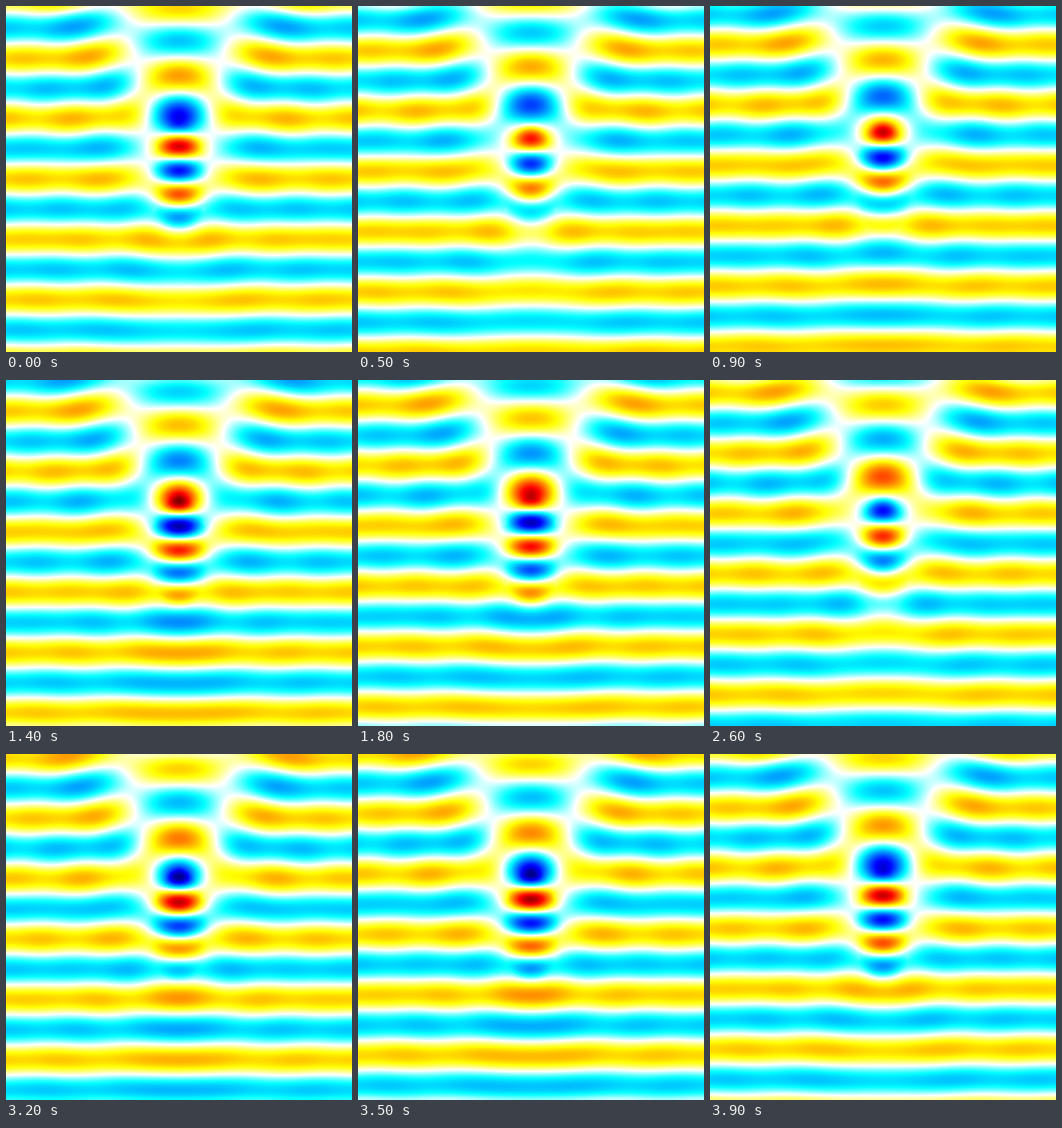
These frames come from a looping animation (360x360 px, 4 s). A matplotlib script:

```python
import numpy as np
import matplotlib.pyplot as plt
from matplotlib.animation import FuncAnimation
from matplotlib.colors import LinearSegmentedColormap

# Plane wave going up past an upright glass spheroid, solved with the
# discrete dipole approximation. Unit of length: its long semi-axis.
K = 6.0              # wave number outside
INDEX = 1.5          # refractive index inside
WIDTH = 0.5          # short semi-axis
STEP = 1 / 20        # dipole spacing
VIEW = 120           # cells across the picture
BOX = (19, 20, 40)   # cells around the spheroid
LIMIT = 2.9          # field value at the ends of the colour scale
FRAMES = 40


def centred(count):
    return (np.arange(count) - (count - 1) / 2) * STEP


def dipole_tensor(x, y, z):
    """Field tensor of a point dipole, zero at the dipole itself."""
    pos = np.stack(np.broadcast_arrays(x, y, z)).astype(float)
    r = np.sqrt((pos**2).sum(axis=0))
    origin = r < STEP / 10
    r[origin] = 1
    unit = pos / r
    wave = np.where(origin, 0, np.exp(1j * K * r) / r)
    near = (1 - 1j * K * r) / r**2
    eye = np.eye(3).reshape((3, 3) + (1,) * r.ndim)
    outer = unit[:, None] * unit[None]
    return wave * (eye * (K**2 - near) + outer * (3 * near - K**2))


def polarizability():
    """Lattice dispersion relation for a wave along a lattice axis."""
    eps = INDEX**2
    static = 3 / (4 * np.pi) * (eps - 1) / (eps + 2)
    kd = K * STEP
    shift = (-1.8915316 + 0.1648469 * eps) * kd**2 - 2j / 3 * kd**3
    return STEP**3 * static / (1 + static * shift)


def solve_dipoles(inside, z):
    alpha = polarizability()
    axes = (1, 2, 3)
    size = [2 * n for n in BOX]
    offsets = [np.fft.fftfreq(n, 1 / n) * STEP for n in size]
    kernel = dipole_tensor(*np.meshgrid(*offsets, indexing="ij"))
    kernel = np.fft.fftn(kernel, axes=(2, 3, 4))

    def apply(p):
        spread = np.fft.fftn(p, s=size, axes=axes)
        field = np.fft.ifftn((kernel * spread).sum(axis=1), axes=axes)
        return inside * (p - alpha * field[:, :BOX[0], :BOX[1], :BOX[2]])

    rest = np.zeros((3,) + BOX, dtype=complex)
    rest[0] = alpha * np.exp(1j * K * z) * inside
    dipoles = np.zeros_like(rest)
    goal = 1e-4 * np.linalg.norm(rest)
    way, power = rest.copy(), (rest * rest).sum()
    for _ in range(150):
        image = apply(way)
        gain = power / (way * image).sum()
        dipoles += gain * way
        rest -= gain * image
        if np.linalg.norm(rest) < goal:
            break
        last, power = power, (rest * rest).sum()
        way = rest + power / last * way
    return dipoles


def field_in_view():
    """Complex field across the plane x = 0, rows going up."""
    x, y, z = np.meshgrid(*map(centred, BOX), indexing="ij")
    inside = (x**2 + y**2) / WIDTH**2 + z**2 < 1
    dipoles = solve_dipoles(inside, z)

    size = VIEW + BOX[2]
    shift = np.arange(size)
    shift[shift >= VIEW] -= size
    dy = (shift - (VIEW - BOX[1]) / 2)[:, None] * STEP
    dz = (shift - (VIEW - BOX[2]) / 2)[None, :] * STEP
    total = np.zeros((size, size), dtype=complex)
    for i, layer in enumerate(centred(BOX[0])):
        tensor = dipole_tensor(-layer, dy, dz)[0]
        spread = np.fft.fft2(dipoles[:, i], s=(size, size))
        total += (np.fft.fft2(tensor) * spread).sum(axis=0)
    field = np.fft.ifft2(total)[:VIEW, :VIEW] + np.exp(1j * K * centred(VIEW))

    # Within the glass the field follows from the polarization.
    middle = BOX[0] // 2
    left, low = (VIEW - BOX[1]) // 2, (VIEW - BOX[2]) // 2
    patch = field[left:left + BOX[1], low:low + BOX[2]]
    glass = 4 * np.pi / ((INDEX**2 - 1) * STEP**3) * dipoles[0, middle]
    patch[inside[middle]] = glass[inside[middle]]
    return field.T


cmap = LinearSegmentedColormap.from_list("wave", [
    (0, "#000080"), (0.125, "#0000ff"), (0.375, "#00ffff"), (0.5, "#ffffff"),
    (0.625, "#ffff00"), (0.875, "#ff0000"), (1, "#800000")], N=512)

field = field_in_view()

fig = plt.figure(figsize=(3.6, 3.6), dpi=100)
ax = fig.add_axes([0, 0, 1, 1])
ax.axis("off")
picture = ax.imshow(field.real, cmap=cmap, vmin=-LIMIT, vmax=LIMIT,
                    origin="lower", interpolation="bicubic", aspect="auto")


def draw(frame):
    phase = 2 * np.pi * frame / FRAMES
    picture.set_data((field * np.exp(-1j * phase)).real)
    return [picture]


anim = FuncAnimation(fig, draw, frames=FRAMES, interval=100, repeat=True)
plt.show()
```
